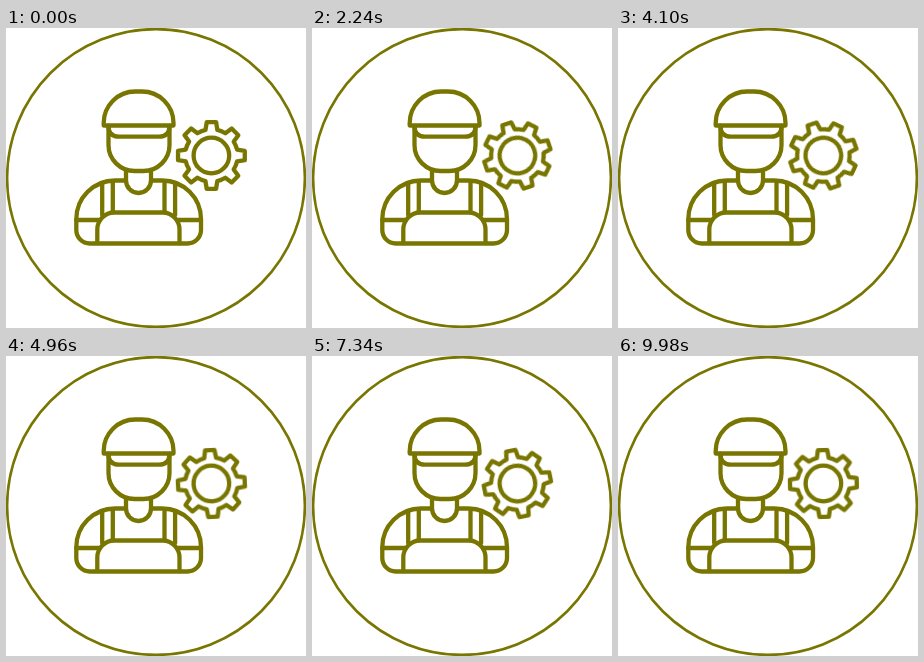
Recreate the animation shown at these times as an HTML page. Size 300 by 300 pixels, loop 10 s.

```html
<!DOCTYPE html>
<html lang="en">
<head>
<meta charset="utf-8">
<title>Worker and gear</title>
<style>
  html, body { margin: 0; width: 100%; height: 100%; overflow: hidden; background: #fff; }
  svg { display: block; width: 100vw; height: 100vh; }
  .ink { fill: none; stroke: #787600; stroke-width: 4.3; stroke-linecap: round; stroke-linejoin: round; }
  .ring { stroke-width: 2.6; }
  .gear { transform-origin: 205.4px 127.5px; animation: turn 10s linear infinite; }
  @keyframes turn { to { transform: rotate(720deg); } }
</style>
</head>
<body>
<svg viewBox="0 0 300 300">
  <g class="ink">
    <circle class="ring" cx="150" cy="150" r="148.9"/>
    <!-- cap and visor -->
    <path d="M97.700 97.500V95A31.500 31.500 0 0 1 129.200 63.500H136A31.500 31.500 0 0 1 167.500 95V97.500Z"/>
    <path d="M102.500 98C102.500 105 106 108.700 113 108.700H153C160 108.700 163.500 105 163.500 98"/>
    <!-- head and neck -->
    <path d="M102.500 98V117A26 26 0 0 0 128.500 143H137.500A26 26 0 0 0 163.500 117V98"/>
    <path d="M120 143V152.500A12.500 12.500 0 0 0 145 152.500V143"/>
    <!-- body -->
    <path d="M120 152.500H109A38.700 38.700 0 0 0 70.300 191.200V202A13.500 13.500 0 0 0 83.800 215.500H181.500A13.500 13.500 0 0 0 195 202V191.200A38.700 38.700 0 0 0 156.300 152.500H145"/>
    <path d="M91.300 215V201.500A17 17 0 0 1 108.300 184.500H156.500A17 17 0 0 1 173.500 201.500V215"/>
    <path d="M96.200 155V187M106.800 154V184M158.500 154V184M169.100 155V187M70.300 192H94M171 192H195"/>
    <g class="gear">
      <circle cx="205.4" cy="127.5" r="17.8"/>
      <path id="teeth"/>
    </g>
  </g>
</svg>
<script>
  const point = (radius, degrees) => {
    const a = degrees * Math.PI / 180;
    return (205.4 + radius * Math.sin(a)).toFixed(2) + ' ' + (127.5 - radius * Math.cos(a)).toFixed(2);
  };
  let outline = '';
  for (let i = 0; i < 8; i++) {
    const mid = i * 45;
    outline += (i ? 'A26.3 26.3 0 0 1 ' : 'M') + point(26.3, mid - 13) +
      'L' + point(33.7, mid - 8) + 'L' + point(33.7, mid + 8) + 'L' + point(26.3, mid + 13);
  }
  document.getElementById('teeth').setAttribute('d', outline + 'A26.3 26.3 0 0 1 ' + point(26.3, -13) + 'Z');
</script>
</body>
</html>
```
